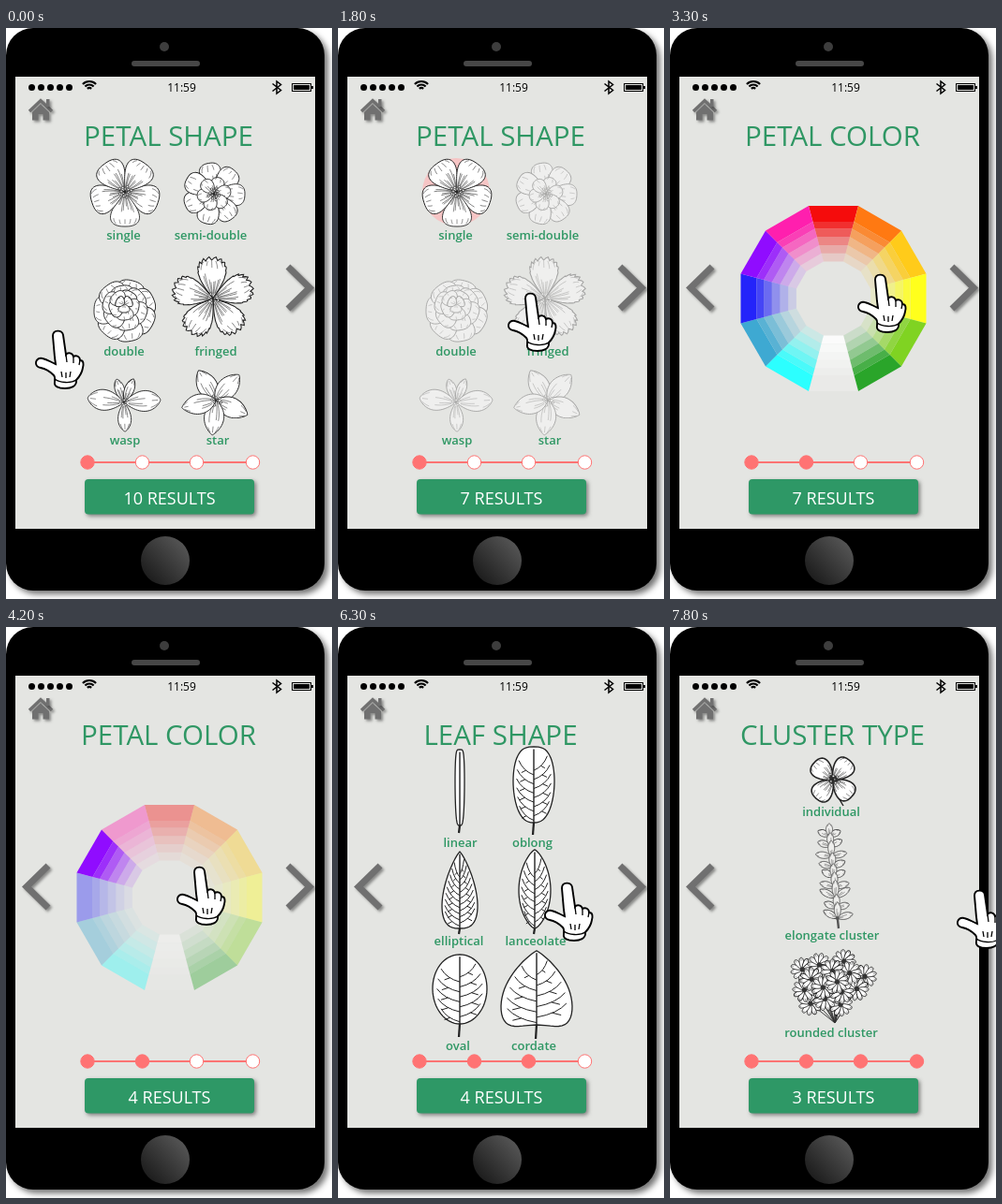
An HTML page with a canvas for the animation above (8000 ms loop, 348 px wide and 610 px high).

```html
<!DOCTYPE html>
<html lang="en">
<head>
<meta charset="utf-8">
<title>Flower finder</title>
<style>
html, body { margin: 0; width: 100%; height: 100%; overflow: hidden; background: #fff; }
canvas { display: block; width: 348px; height: 610px; }
</style>
</head>
<body>
<canvas id="stage"></canvas>
<script>
const W = 348, H = 610, LOOP = 8000, STEP = 300, TAU = Math.PI * 2;
const GREEN = '#2f9764', PINK = '#ff7373', SCREEN = '#e4e5e2', GREY = '#707070';
const FONT = '"Open Sans", "Noto Sans", sans-serif';
const canvas = document.getElementById('stage');
const ratio = window.devicePixelRatio || 1;
canvas.width = W * ratio;
canvas.height = H * ratio;
const c = canvas.getContext('2d');

let ink = '#222', paper = '#fff', seed = 1;
const random = () => (seed = seed * 16807 % 2147483647) / 2147483647;
const rad = deg => deg * Math.PI / 180;

function at(x, y, deg, draw) {
  c.save();
  c.translate(x, y);
  c.rotate(rad(deg));
  draw();
  c.restore();
}
function line(points, color, width) {
  c.beginPath();
  points.forEach(([x, y]) => c.lineTo(x, y));
  c.strokeStyle = color;
  c.lineWidth = width;
  c.stroke();
}
function disc(x, y, r, fill, stroke, width = 1) {
  c.beginPath();
  c.arc(x, y, r, 0, TAU);
  if (fill) { c.fillStyle = fill; c.fill(); }
  if (stroke) { c.strokeStyle = stroke; c.lineWidth = width; c.stroke(); }
}
function box(x, y, w, h, r, fill) {
  c.beginPath();
  c.roundRect(x, y, w, h, r);
  c.fillStyle = fill;
  c.fill();
}
function text(str, x, y, size, color, weight = 400) {
  c.font = `${weight} ${size}px ${FONT}`;
  c.textAlign = 'center';
  c.fillStyle = color;
  c.fillText(str, x, y);
}
function shadowed(blur, offset, alpha, draw) {
  c.save();
  c.shadowColor = `rgba(0,0,0,${alpha})`;
  c.shadowBlur = blur * ratio;
  c.shadowOffsetX = c.shadowOffsetY = offset * ratio;
  draw();
  c.restore();
}

// Half-width of a petal or leaf along its length; a rounds the base, b the tip.
function profile(wide, a, b) {
  const m = a / (a + b), peak = m ** a * (1 - m) ** b;
  return q => wide * q ** a * (1 - q) ** b / peak;
}
function blade(len, wide, { a = 0.8, b = 0.45, frill = 0, lobe = 0, weight = 0.9 } = {}) {
  const half = profile(wide, a, b), n = 32;
  c.beginPath();
  for (let i = 0; i <= 2 * n; i++) {
    const q = (1 - Math.cos(Math.PI * i / n)) / 2;
    const y = half(q) * (i < n ? -1 : 1);
    const wave = 1 + frill * Math.sin(i * 2.1) * q;
    c.lineTo((len * q - lobe * (y / wide) ** 2 * (1 - q) ** 3) * wave, y * wave);
  }
  c.closePath();
  c.fillStyle = paper;
  c.fill();
  c.strokeStyle = ink;
  c.lineWidth = weight;
  c.stroke();
  return half;
}
function hatch(len, half, count) {
  for (let i = 0; i < count; i++) {
    const v = (i + 0.5) / count * 1.7 - 0.85, outer = i % 3 === 0;
    const from = outer ? 0.93 : 0.12, to = outer ? 0.72 + random() * 0.1 : 0.35 + random() * 0.3;
    const points = [];
    for (let k = 0; k <= 5; k++) {
      const q = from + (to - from) * k / 5;
      points.push([len * q, v * half(q)]);
    }
    line(points, ink, 0.5);
  }
}
function ring(x, y, count, len, wide, turn, options = {}, lines = 9) {
  for (let i = 0; i < count; i++) {
    at(x, y, turn + i * 360 / count, () => hatch(len, blade(len, wide, options), lines));
  }
}
function stamens(x, y, r, count = 12) {
  for (let i = 0; i < count; i++) {
    const a = i * 2.4, d = r * Math.sqrt((i + 0.5) / count);
    const px = x + d * Math.cos(a), py = y + d * Math.sin(a);
    line([[x, y], [px, py]], ink, 0.6);
    disc(px, py, 1.2, paper, ink, 0.7);
  }
}

function single(x, y) {
  ring(x, y, 5, 37, 15.5, 18, { a: 1.1, b: 0.4 }, 13);
  stamens(x, y, 7, 14);
}
function semiDouble(x, y) {
  ring(x, y, 7, 33, 11.5, -100, { a: 1, b: 0.4 });
  ring(x, y, 6, 18, 7, -70, { a: 0.9, b: 0.5 }, 5);
  stamens(x, y, 7);
}
function double(x, y) {
  ring(x, y, 7, 33, 15, -75, { a: 0.9, b: 0.4 }, 9);
  ring(x, y - 3, 6, 24, 12, -100, { a: 0.8, b: 0.4 }, 8);
  ring(x - 1, y - 6, 5, 16, 9, -60, { a: 0.8, b: 0.4 }, 6);
  ring(x - 1, y - 7, 3, 9, 6, -30, { a: 0.7, b: 0.4 }, 4);
}
function fringed(x, y) {
  ring(x, y, 5, 43, 15, -92, { a: 1.1, b: 0.45, frill: 0.05, weight: 1.1 }, 13);
  stamens(x, y, 6, 9);
}
function wasp(x, y) {
  const petals = [[-108, 26, 5], [-68, 27, 5], [187, 39, 11], [-4, 39, 11], [88, 31, 7]];
  petals.forEach(([deg, len, wide]) =>
    at(x, y, deg, () => hatch(len, blade(len, wide, { a: 1, b: 0.75 }), 7)));
  stamens(x, y, 4, 6);
}
function star(x, y) {
  ring(x, y, 5, 37, 10.5, -120, { a: 0.8, b: 0.85 }, 7);
  stamens(x, y, 6, 9);
}

function leaf(x, base, len, wide, a, b, stem, veins, lobe = 0) {
  at(x, base, -90, () => {
    line([[-stem, -1], [0, 0]], ink, 2.2);
    const half = blade(len, wide, { a, b, lobe, weight: 1.3 });
    line([[0, 0], [len * 0.97, 0]], ink, 1.4);
    for (let i = 0; i < 2 * veins; i++) {
      const side = i % 2 ? 1 : -1;
      const q = 0.03 + 0.72 * i / (2 * veins), end = q + 0.19;
      const y = side * half(end) * 0.84, start = len * q, tip = len * end;
      c.beginPath();
      c.moveTo(start, 0);
      c.quadraticCurveTo(start + len * 0.05, y * 0.7, tip, y);
      c.moveTo(start + len * 0.06, y * 0.52);
      c.lineTo(start + len * 0.03, y * 0.82);
      c.strokeStyle = ink;
      c.lineWidth = 1;
      c.stroke();
    }
  });
}

function lone(x, y) {
  line([[x, y], [x + 5, y + 18], [x + 11, y + 28]], ink, 1.4);
  ring(x, y, 4, 27, 11, 42, { a: 0.9, b: 0.4, weight: 1.6 }, 11);
  disc(x, y, 5, '#333');
  stamens(x, y, 7, 9);
}
function spike(x, top) {
  ink = '#555';
  paper = '#eeeeec';
  line([[x - 4, top], [x, top + 45], [x + 7, top + 108]], ink, 2.4);
  for (let i = 0; i < 9; i++) {
    const y = top + 9 + i * 11, px = x - 3 + i * 1.1, len = 13 + 7 * random();
    for (const deg of [-35 + 25 * random(), 215 - 30 * random(), -90]) {
      at(px, y, deg, () => hatch(len, blade(len, 3.5, { a: 0.8, b: 0.7 }), 4));
    }
    disc(px, y, 2, ink);
  }
}
function bouquet(x, y) {
  const heads = Array.from({ length: 15 }, (_, i) => {
    const d = Math.sqrt((i + 0.4) / 15), a = i * 2.4;
    return [x + 39 * d * Math.cos(a), y + 29 * d * Math.sin(a)];
  });
  heads.forEach(head => line([head, [x + 4, y + 44]], '#333', 0.9));
  heads.reverse().forEach(([hx, hy], i) => {
    ring(hx, hy, 11, 12.5, 2.3, i * 17, { a: 0.7, b: 0.4, weight: 0.9 }, 1);
    disc(hx, hy, 2.6, '#333');
  });
}

const petalItems = [
  ['single', 125.5, 226, 127, 175, () => single(127, 175)],
  ['semi-double', 218.5, 226, 222, 177, () => semiDouble(222, 177)],
  ['double', 126, 350, 127, 302, () => double(127, 302)],
  ['fringed', 224, 350, 221, 289, () => fringed(221, 289)],
  ['wasp', 127, 445, 126, 400, () => wasp(126, 400)],
  ['star', 226, 445, 224, 399, () => star(224, 398)]
];
const leafItems = [
  ['linear', 130.5, 235, 130, 172, () => leaf(130, 212, 81, 5, 0.25, 0.18, 8, 0)],
  ['oblong', 207.5, 235, 209, 170, () => leaf(209, 209, 81, 22, 0.4, 0.33, 13, 6)],
  ['elliptical', 129, 340, 130, 282, () => leaf(130, 322, 82, 19, 0.35, 0.85, 6, 9)],
  ['lanceolate', 211, 340, 210, 282, () => leaf(210, 322, 84, 17, 0.7, 0.75, 6, 7)],
  ['oval', 128, 452, 130, 388, () => leaf(130, 424, 74, 29, 0.5, 0.48, 14, 5)],
  ['cordate', 209, 452, 212, 390, () => leaf(212, 425, 79, 38, 0.36, 0.85, 15, 5, 13)]
];
const clusterItems = [
  ['individual', 172, 202, 174, 164, () => lone(174, 163)],
  ['elongate cluster', 173, 334, 173, 268, () => spike(173, 214)],
  ['rounded cluster', 172, 438, 172, 380, () => bouquet(172, 379)]
];

function gallery(items, chosen) {
  items.forEach(([label, lx, ly, x, y, draw], i) => {
    const faded = chosen >= 0 && i !== chosen;
    ink = faded ? '#a6a6a5' : '#222';
    paper = faded ? '#efefee' : '#fff';
    seed = 71 + i;
    if (i === chosen) disc(x - 1, y, 36, '#f6c5c5');
    draw();
    text(label, lx, ly, 13, GREEN, 600);
  });
}

const hues = ['#f50c0c', '#ff7912', '#ffcb1a', '#ffff1c', '#80d322', '#2aa52a', '#ffffff',
  '#2cffff', '#3ea9d2', '#2424fa', '#900cff', '#ff1fae'];
const bands = [102.5, 85, 77, 68, 59, 50, 41], tints = [1, 0.83, 0.63, 0.44, 0.27, 0.13];

function wheel(chosen) {
  const cx = 174.5, cy = 289;
  hues.forEach((hue, i) => {
    const left = rad(i * 30 - 105), right = left + rad(30);
    const point = (r, a) => c.lineTo(cx + r * Math.cos(a), cy + r * Math.sin(a));
    const fade = chosen >= 0 && chosen !== i ? 0.38 : 1;
    tints.forEach((tint, k) => {
      c.beginPath();
      point(bands[k], left);
      point(bands[k], right);
      point(bands[k + 1], right);
      point(bands[k + 1], left);
      c.globalAlpha = fade * (i === 6 ? 0.95 - tint * 0.75 : tint);
      c.fillStyle = hue;
      c.fill();
    });
  });
  c.globalAlpha = 1;
}

function chevron(tip, back) {
  shadowed(3, 2, 0.4, () => line([[back, 255], [tip, 277.5], [back, 300]], GREY, 7));
}

function phone() {
  c.fillStyle = '#fff';
  c.fillRect(0, 0, W, H);
  shadowed(6, 4, 0.55, () => box(0, 0, 340, 601, 29, '#000'));
  disc(169, 20, 5, '#3d3d3d');
  box(134, 35, 73, 6, 3, '#474747');
  const shine = c.createLinearGradient(150, 588, 190, 550);
  shine.addColorStop(0, '#1c1c1c');
  shine.addColorStop(1, '#555');
  disc(170, 569, 26, shine);
  c.fillStyle = SCREEN;
  c.fillRect(10, 52, 320, 483);
}

function statusBar() {
  for (let i = 0; i < 5; i++) disc(27.5 + i * 10, 63.5, 3.5, '#000');
  for (const r of [3, 6.5, 10]) {
    c.beginPath();
    c.arc(89, 67, r, rad(-135), rad(-45));
    c.strokeStyle = '#000';
    c.lineWidth = 2.2;
    c.stroke();
  }
  text('11:59', 187.5, 67.5, 12, '#000', 500);
  line([[284.5, 59.5], [293.5, 66.5], [289, 70], [289, 57], [293.5, 60.5], [284.5, 67.5]], '#000', 1.5);
  c.strokeStyle = '#000';
  c.lineWidth = 1;
  c.strokeRect(305.5, 59.5, 20, 8);
  box(307, 61, 17, 5, 0, '#000');
  box(326, 62, 2, 3, 0, '#000');
}

function homeIcon() {
  shadowed(3, 2, 0.4, () => {
    line([[25, 89], [37, 77.5], [49, 89]], GREY, 3.4);
    box(43, 76, 3.5, 8, 0, GREY);
    c.fillStyle = GREY;
    c.fill(new Path2D('M28 90L37 81.5L46 90V98.5H39.5V92H34.5V98.5H28Z'));
  });
}

function progress(page) {
  const stops = [87, 145.5, 203.5, 263.5];
  line([[87, 464], [263, 464]], PINK, 2);
  stops.forEach((x, i) => disc(x, 464, 7.2, i <= page ? PINK : '#fff', PINK, 1));
}

function resultsButton(count) {
  shadowed(4, 2, 0.45, () => box(84, 482, 181, 37.5, 4, '#2e9866'));
  text(`${count} RESULTS`, 174.5, 508.5, 18, '#fff');
}

const glove = new Path2D('M-7 5C-7-2 3-2 4 4L7 25C9 22 14 23 15 27C18 25 22 27 22 31C26 31 26 35 25 39' +
  'C24 45 21 49 18 52C19 59 12 61 6 61C-1 61-6 59-5 54C-5 50-4 49-6 47C-10 43-14 40-20 39' +
  'C-28 38-26 27-18 29C-13 30-9 33-4 35L-5 28Z');
const creases = new Path2D('M7 25L8 33M15 27L15 34M22 31L21 36M-5 51C0 55 12 56 18 52M2 43L3 49M7 44V50M12 43L11 49');

function hand(x, y) {
  at(x, y, 0, () => {
    c.fillStyle = '#fff';
    c.fill(glove);
    c.strokeStyle = '#000';
    c.lineWidth = 1.9;
    c.stroke(glove);
    c.lineWidth = 1.3;
    c.stroke(creases);
  });
}

// Hand stops: time in ms, then fingertip position.
const route = [[0, 57, 324], [300, 70, 285], [900, 124, 195], [1200, 128, 184], [1800, 207, 284],
  [2100, 285, 280], [2400, 326, 276], [2700, 328, 275], [3000, 292, 271], [3300, 226, 264],
  [3900, 98, 244], [4200, 208, 257], [4500, 278, 267], [5100, 327, 274], [5400, 328, 274],
  [5700, 312, 274], [6300, 246, 274], [6600, 214, 279], [7200, 332, 282], [LOOP, 332, 282]];

function handAt(t) {
  const i = route.findIndex(stop => stop[0] > t);
  const [t0, x0, y0] = route[i - 1], [t1, x1, y1] = route[i];
  const k = (t - t0) / (t1 - t0);
  return [x0 + (x1 - x0) * k, y0 + (y1 - y0) * k];
}

const pages = [
  { start: 0, pick: 1200, choice: 0, title: 'PETAL SHAPE', before: 10, after: 7, body: n => gallery(petalItems, n) },
  { start: 2700, pick: 3900, choice: 10, title: 'PETAL COLOR', before: 7, after: 4, body: wheel },
  { start: 5400, pick: 6600, choice: 3, title: 'LEAF SHAPE', before: 4, after: 3, body: n => gallery(leafItems, n) },
  { start: 7800, pick: LOOP, choice: 0, title: 'CLUSTER TYPE', before: 3, after: 3, body: n => gallery(clusterItems, n) }
];

function draw(t) {
  const index = pages.findLastIndex(p => t >= p.start), page = pages[index];
  const picked = t >= page.pick;
  c.setTransform(ratio, 0, 0, ratio, 0, 0);
  phone();
  statusBar();
  homeIcon();
  text(page.title, 173.5, 126, 29.5, GREEN);
  page.body(picked ? page.choice : -1);
  if (index > 0) chevron(22, 45);
  if (index < pages.length - 1) chevron(324, 301);
  progress(index);
  resultsButton(picked ? page.after : page.before);
  hand(...handAt(t));
}

const began = performance.now();
let shown = -1;
function tick() {
  const step = Math.floor((performance.now() - began) % LOOP / STEP);
  if (step !== shown) draw((shown = step) * STEP);
  requestAnimationFrame(tick);
}
tick();
</script>
</body>
</html>
```
